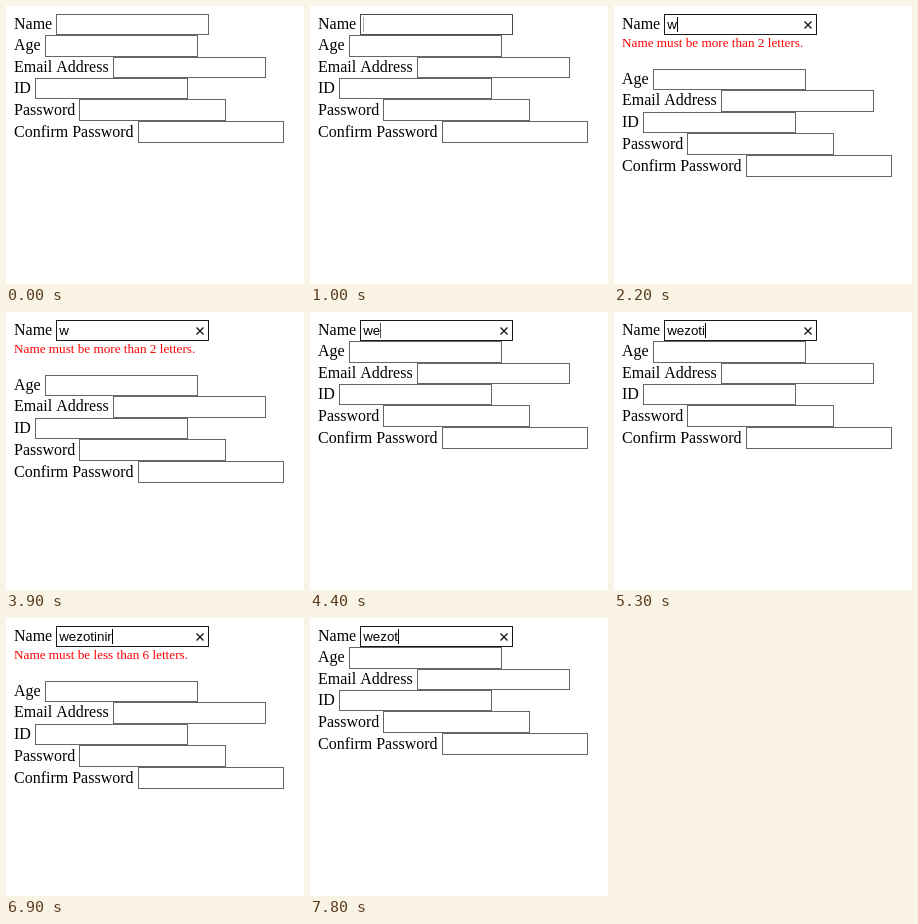
Animation, 298 px wide and 278 px high, one loop 8000 ms. Source, as an HTML page with a canvas:

```html
<!DOCTYPE html>
<html lang="en">
<head>
<meta charset="utf-8">
<title>Form validation</title>
<style>
  html, body { margin: 0; width: 100%; height: 100%; overflow: hidden; background: #fff; }
  canvas { display: block; width: 298px; height: 278px; }
</style>
</head>
<body>
<canvas id="stage" width="298" height="278"></canvas>
<script>
const ctx = document.getElementById('stage').getContext('2d');
const { round, floor, max, min } = Math;

const LOOP = 8000;
const TICK = 100;
const LABEL_FONT = '16px "Liberation Serif", "Times New Roman", serif';
const ERROR_FONT = '13.2px "Liberation Serif", "Times New Roman", serif';
const INPUT_FONT = '13.333px "Liberation Sans", Arial, sans-serif';

const LABELS = ['Name', 'Age', 'Email Address', 'ID', 'Password', 'Confirm Password'];
const MARGIN = 8;
const LABEL_GAP = 4.05;
const FIRST_TOP = 7.8;
const ROW = 21.4;
const ERROR_HEIGHT = 33.8;
const TEXT_BOX = { width: 153, height: ROW };
const PASSWORD_BOX = { width: 146.4, height: 22 };

const WORD = 'wezotinir';
const FOCUS = 1000;
const TYPED = [2200, 4000, 4500, 4800, 5200, 5300, 5500, 5700, 6900];
const DELETED = [7300, 7500, 7600, 7800];

const clamp = v => max(0, min(1, v));
const mix = (a, b, k) => a + (b - a) * k;

function text(str, x, y, font, color) {
  ctx.font = font;
  ctx.fillStyle = color;
  ctx.fillText(str, x, y);
}

function tracePoints(points, x, y) {
  ctx.beginPath();
  for (const [px, py] of points) ctx.lineTo(x + px, y + py);
}

function errorFor(count) {
  if (count === 1) return 'Name must be more than 2 letters.';
  if (count > 6) return 'Name must be less than 6 letters.';
  return '';
}

function drawField(label, row, shift, focus) {
  const box = label.includes('Password') ? PASSWORD_BOX : TEXT_BOX;
  const y = FIRST_TOP + row * ROW + shift;
  const top = round(y);
  text(label, MARGIN, top + floor(box.height) - 6, LABEL_FONT, '#000');

  const x = MARGIN + ctx.measureText(label).width + LABEL_GAP;
  const left = round(x);
  const width = round(x + box.width) - left;
  const height = round(y + box.height) - top;
  ctx.strokeStyle = `rgba(0, 0, 0, ${mix(0.6, 0.9, focus)})`;
  ctx.lineWidth = 1;
  ctx.strokeRect(left + 0.5, top + 0.5, width - 1, height - 1);
}

function drawClearButton() {
  ctx.strokeStyle = '#222';
  ctx.lineWidth = 1.4;
  for (const side of [-1, 1]) {
    tracePoints([[-3.5 * side, -3.5], [3.5 * side, 3.5]], 194, 19);
    ctx.stroke();
  }
}

// Each key press restarts the blink: hold, fade out, pause, fade in.
function caretOpacity(sinceKey) {
  const phase = sinceKey % 1100;
  return phase < 1000 ? clamp((600 - phase) / 300) : 0.5;
}

function drawInput(typed, opacity) {
  const x = 53.2;
  text(typed, x, 23, INPUT_FONT, '#000');
  ctx.fillStyle = `rgba(0, 0, 0, ${opacity})`;
  ctx.fillRect(round(x + ctx.measureText(typed).width), 11, 1, 15);
}

// The pointer crosses the page in three steps and leaves.
function drawPointer(t) {
  const k = (t - 500) / 200;
  if (k < 0 || k > 1) return;
  tracePoints([[0, 0], [0, 16], [4, 12.5], [6.5, 18.5], [9, 17.5], [6.5, 11.5], [11.5, 11.5]],
    mix(286, 150, k) + 0.5, mix(227, 5, k) + 0.5);
  ctx.closePath();
  ctx.fillStyle = '#fff';
  ctx.fill();
  ctx.strokeStyle = '#000';
  ctx.lineWidth = 1;
  ctx.stroke();
}

function draw(time) {
  const t = floor(time / TICK) * TICK;
  const past = times => times.filter(key => key <= t);
  const count = past(TYPED).length - past(DELETED).length;
  const lastKey = max(...past([FOCUS, ...TYPED, ...DELETED]), 0);
  const focus = clamp((t - FOCUS + TICK) / 300);
  const error = errorFor(count);

  ctx.fillStyle = '#fff';
  ctx.fillRect(0, 0, 298, 278);
  ctx.textRendering = 'optimizeSpeed';

  LABELS.forEach((label, row) =>
    drawField(label, row, row && error ? ERROR_HEIGHT : 0, row ? 0 : focus));
  text(error, MARGIN, 41, ERROR_FONT, '#f00');
  if (count) drawClearButton();
  if (focus) drawInput(WORD.slice(0, count), focus * caretOpacity(t - lastKey));
  drawPointer(t);
}

const start = performance.now();
function frame() {
  draw((performance.now() - start) % LOOP);
  requestAnimationFrame(frame);
}
frame();
</script>
</body>
</html>
```
